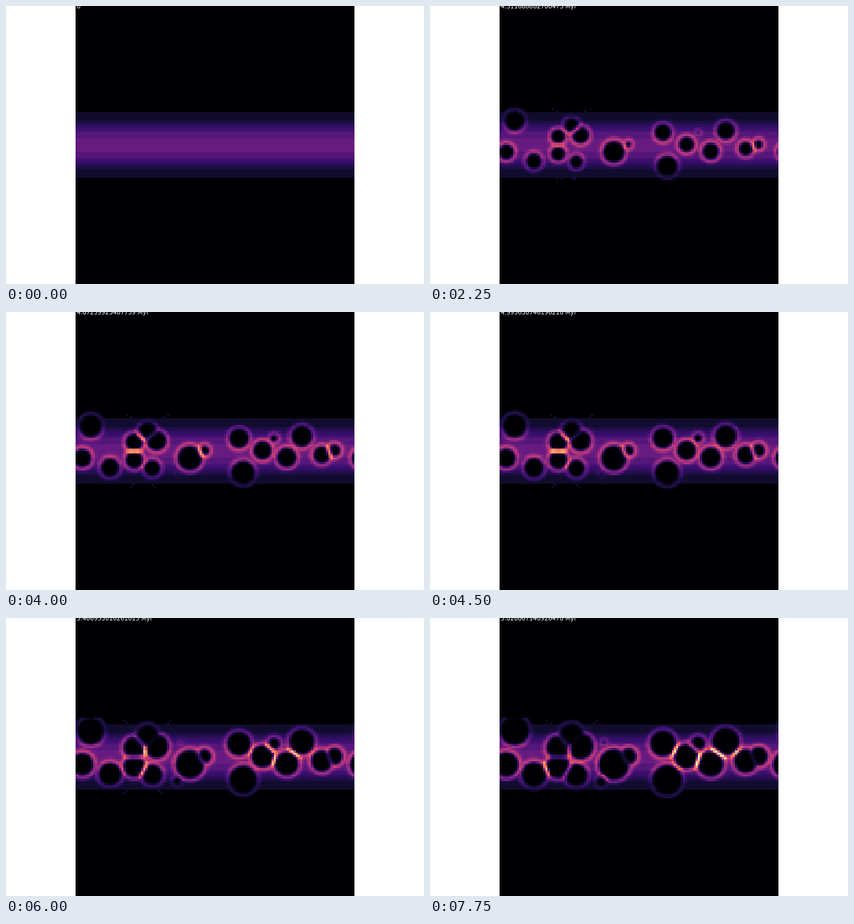
An HTML page with a canvas for the animation above (8 s loop, 691x460 px).

```html
<!DOCTYPE html>
<html>
<head>
<meta charset="utf-8">
<style>
html, body { margin: 0; width: 100%; height: 100%; overflow: hidden; background: #fff; }
canvas { display: block; }
</style>
</head>
<body>
<canvas id="stage" width="691" height="460"></canvas>
<script>
const LOOP = 8000, STEP = 250;
const N = 128, LEFT = 115, TOP = -0.6, SIZE = 461, CELL = SIZE / N;
const MID = TOP + SIZE / 2;
const T_START = 4.208237388655487, T_END = 5.828867140926478;

// Key readings of the clock: [step, simulated time in Myr]
const CLOCK = [
  [0, 0], [1, 3.937264018255143], [4, T_START], [9, 4.511688882700473],
  [13, 4.68804001789915], [18, 4.995638746196218], [24, 5.486955016261015], [31, T_END]
];

// Where stars explode and how far each bubble gets; the rest follows from rules
const BUBBLES = [
  [140, 191, 27], [126, 241, 24], [172, 256, 24],
  [212, 216, 23], [212, 244, 23], [234, 198, 23], [249, 214, 25], [242, 257, 22],
  [304, 241, 29], [328, 229, 17], [283, 267, 11], [288, 208, 6],
  [385, 210, 25], [392, 264, 28], [424, 229, 24], [443, 210, 15],
  [464, 240, 25], [489, 207, 26], [522, 236, 23], [543, 229, 19]
].map(([x, y, size]) => ({ x, y, size, age: size / 10 }));

const MAGMA = ['000004', '140e36', '3b0f70', '641a80', '8c2981', 'b73779',
  'de4968', 'f7705c', 'fe9f6d', 'fecf92', 'fcfdbf'].map(hex => {
  const n = parseInt(hex, 16);
  return [n >> 16, n >> 8 & 255, n & 255];
});

const ctx = document.getElementById('stage').getContext('2d');
const grid = document.createElement('canvas');
grid.width = grid.height = N;
const gridCtx = grid.getContext('2d');
const image = gridCtx.createImageData(N, N);

const clamp = (v, lo = 0, hi = 1) => Math.min(hi, Math.max(lo, v));
const bell = d => Math.exp(-((d / 3.5) ** 2));
const wrap = dx => dx - SIZE * Math.round(dx / SIZE);
const distance = (a, b) => Math.hypot(wrap(a.x - b.x), a.y - b.y);
const progress = time => clamp((time - T_START) / (T_END - T_START));

// The disc: two flat bands, a ramp, and a faint rim
function gasAt(y) {
  const k = Math.floor(Math.abs(y - MID) / CELL);
  if (k < 6) return .307 - .043 * Math.floor(k / 3);
  if (k < 11) return .22 - .024 * (k - 6);
  return k < 15 ? .083 : 0;
}

function timeAt(step) {
  const k = CLOCK.findIndex(([s]) => s >= step);
  const [s1, t1] = CLOCK[k];
  if (s1 === step) return t1;
  const [s0, t0] = CLOCK[k - 1];
  return t0 + (t1 - t0) * (step - s0) / (s1 - s0);
}

// Bubbles grow with the root of their age and drift away from the midplane
function bubblesAt(time) {
  return BUBBLES.filter(b => time > T_END - b.age).map(({ x, y, size, age }) => ({
    x,
    y: y + (y - MID) * .1 * progress(time),
    r: size * Math.sqrt(1 - (T_END - time) / age)
  }));
}

// Gas piles up where two bubbles press together, until the wall breaks
function contact(a, b) {
  const overlap = a.r + b.r - distance(a, b);
  const wall = Math.exp(-Math.max(0, overlap - 8) / 5);
  const weight = clamp(Math.min(a.r, b.r) / 22);
  return { wall, boost: wall * weight * clamp((overlap + 4) / 12, 0, .8) };
}

function density(point, bubbles, contacts) {
  const gas = gasAt(point.y);
  const gaps = bubbles.map(b => distance(point, b) - b.r);
  const gap = Math.min(...gaps);
  if (gap > 12) return gas;
  const near = gaps.indexOf(gap), b = bubbles[near];
  const ring = bell(gap);
  let shell = ring, pile = 0;
  gaps.forEach((s, i) => {
    if (i === near || s > 10) return;
    const { wall, boost } = contacts[near][i];
    const sheet = bell((s - gap) / 2) * bell(Math.max(0, s));
    shell = Math.max(shell, sheet * wall);
    pile = Math.max(pile, sheet * boost);
  });
  const swept = Math.max(gas, gasAt((point.y + b.y) / 2));
  const open = clamp(1 + gap / 7);
  const value = gas * open * (1 - ring) + 1.7 * swept * (shell + pile);
  return gas + (value - gas) * clamp(b.r / 9);
}

function paint(col, row, value) {
  const v = clamp(value) * 10, k = Math.min(9, Math.floor(v));
  const o = (row * N + col) * 4;
  for (let c = 0; c < 3; c++) {
    image.data[o + c] = MAGMA[k][c] + (MAGMA[k + 1][c] - MAGMA[k][c]) * (v - k);
  }
  image.data[o + 3] = 255;
}

// Faint gas escaping above and below the disc
function paintWisps(p) {
  const dot = (x, y) => paint(Math.floor((x - LEFT) / CELL), Math.floor((y - TOP) / CELL), .085);
  for (const side of [-1, 1]) {
    for (let i = 0; i < 2; i++) {
      dot(234 + side * (27 + 14 * p - 5 * i), 170 + 3 * i);
      if (p < .9) dot(226 + side * (9 + 27 * p - 4 * i), 287 + 2 * p - 3 * i);
    }
  }
}

function draw(step) {
  const time = timeAt(step);
  const bubbles = bubblesAt(time);
  const contacts = bubbles.map(a => bubbles.map(b => contact(a, b)));
  for (let row = 0; row < N; row++) {
    const y = TOP + (row + .5) * CELL;
    const empty = !bubbles.length || Math.abs(y - MID) > 90;
    for (let col = 0; col < N; col++) {
      const x = LEFT + (col + .5) * CELL;
      paint(col, row, empty ? gasAt(y) : density({ x, y }, bubbles, contacts));
    }
  }
  if (time > 4.1) paintWisps(progress(time));
  gridCtx.putImageData(image, 0, 0);
  ctx.fillStyle = '#fff';
  ctx.fillRect(0, 0, 691, 460);
  ctx.imageSmoothingEnabled = false;
  ctx.drawImage(grid, LEFT, TOP, SIZE, SIZE);
  ctx.font = '9.9px "DejaVu Sans", sans-serif';
  ctx.fillText(time ? time + ' Myr' : '0', 117, 4);
}

let shown = -1;
function tick() {
  const step = Math.floor(performance.now() % LOOP / STEP);
  if (step !== shown) draw(shown = step);
  requestAnimationFrame(tick);
}
tick();
</script>
</body>
</html>
```
